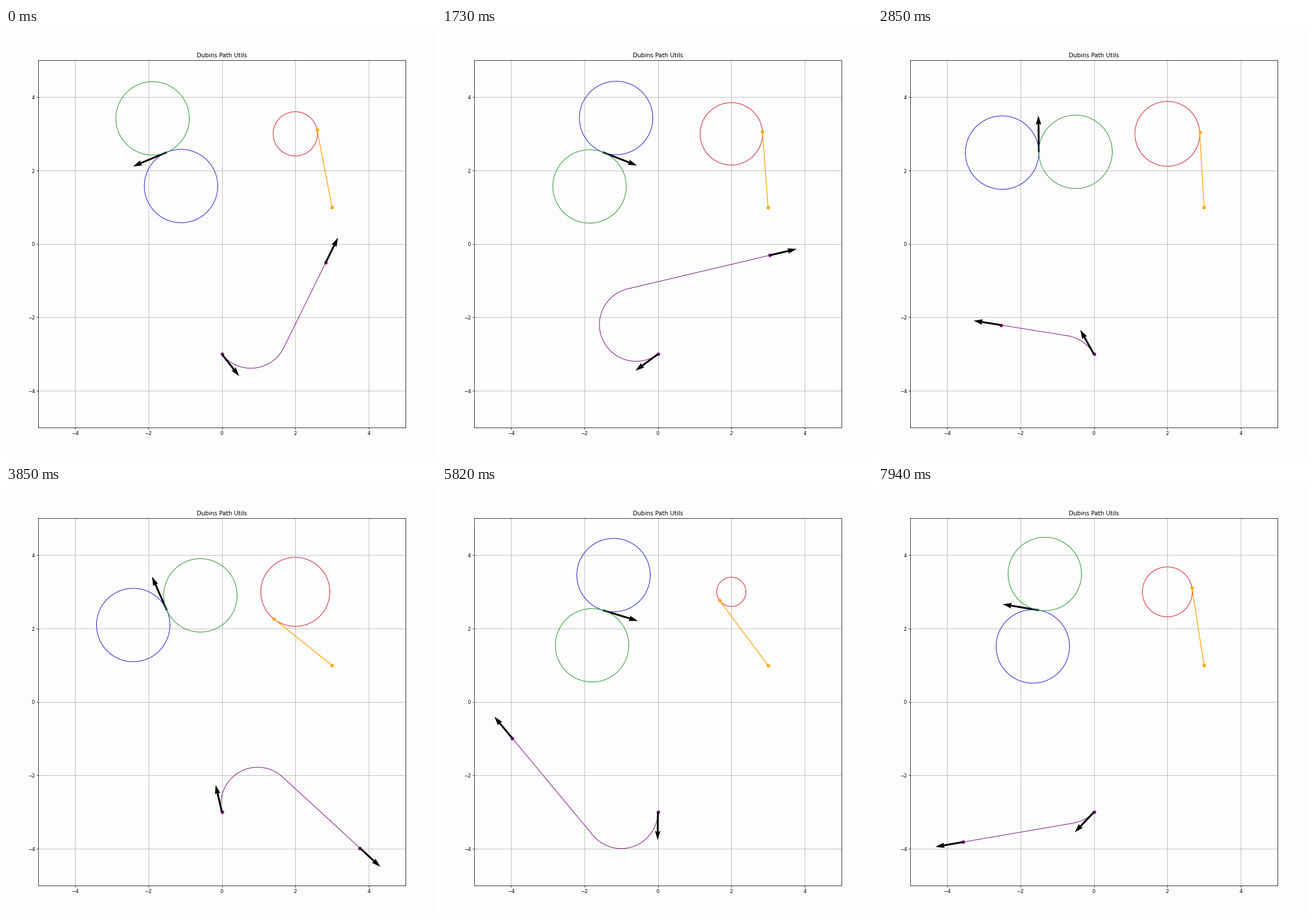
Write a matplotlib script that moves like this. It is 748 px wide and 748 px high and loops after 8 s.

```python
import numpy as np
import matplotlib.pyplot as plt
from matplotlib.animation import FuncAnimation

SIZE, DPI = 748, 100
LOOP, STEP = 8000, 40
PT = 72 / DPI           # points per pixel
K = 0.614               # shrink of matplotlib's default point sizes
RIGHT, LEFT = -1, 1
BLUE, GREEN, RED = "#1818cc", "#25922a", "#cc1a28"
PURPLE, PAPER = "#74107a", "#fdfdfd"

POSE = np.array([-1.5, 2.5])
RED_C = np.array([2.0, 3.0])
ANCHOR = np.array([3.0, 1.0])
START = np.array([0.0, -3.0])

# begin ms, pose heading, red radius, tangent side,
# path heading, turn, path end
SCENES = [
    (0, 202.8, 0.603, 1, -51.9, LEFT, (2.826, -0.509)),
    (720, -21.2, 0.850, 1, 216.3, RIGHT, (3.042, -0.309)),
    (2800, 90.6, 0.883, 1, 119.2, LEFT, (-2.528, -2.208)),
    (3800, 113.8, 0.940, -1, 102.9, RIGHT, (3.755, -3.974)),
    (4840, -17.0, 0.398, -1, -90.5, RIGHT, (-3.969, -0.983)),
    (5960, 52.5, 0.410, -1, 80.2, LEFT, (-3.082, -1.826)),
    (6960, 170.6, 0.680, 1, 226.5, RIGHT, (-3.567, -3.815)),
]


def unit(a):
    return np.array([np.cos(a), np.sin(a)])


def circle(center, r):
    t = np.linspace(0, 2 * np.pi, 181)
    return center[0] + r * np.cos(t), center[1] + r * np.sin(t)


def tangent_point(r, side):
    d = ANCHOR - RED_C
    a = np.arctan2(d[1], d[0]) + side * np.arccos(r / np.hypot(*d))
    return RED_C + r * unit(a)


def turn_then_straight(heading, turn, end):
    """Unit-radius arc from START, then a tangent line to end."""
    center = START + unit(heading + turn * np.pi / 2)
    d = end - center
    out = np.arctan2(d[1], d[0]) + turn * np.arcsin(1 / np.hypot(*d))
    sweep = (turn * (out - heading)) % (2 * np.pi)
    angles = heading + turn * np.linspace(0, sweep, 80) - turn * np.pi / 2
    x = np.append(center[0] + np.cos(angles), end[0])
    y = np.append(center[1] + np.sin(angles), end[1])
    return x, y, out


fig = plt.figure(figsize=(SIZE / DPI, SIZE / DPI), dpi=DPI, facecolor=PAPER)
box = 638.7 / SIZE
ax = fig.add_axes([56.2 / SIZE, 52.9 / SIZE, box, box], facecolor=PAPER)
ax.set(xlim=(-5, 5), ylim=(-5, 5))
ticks = [-4, -2, 0, 2, 4]
ax.set_xticks(ticks)
ax.set_yticks(ticks)
ax.grid(True, color="#b0b0b0", linewidth=0.8 * PT)
ax.tick_params(labelsize=10 * K, length=3.5 * K, width=0.8 * PT, pad=3.5 * K)
for spine in ax.spines.values():
    spine.set_linewidth(0.8 * PT)
ax.set_title("Dubins Path Utils", fontsize=12 * K, pad=6 * K)


def curve(color, width=1.0):
    return ax.plot([], [], color=color, lw=width * PT)[0]


def dots(color):
    return ax.plot([], [], "o", color=color, ms=5.1 * PT, mew=0.85 * PT)[0]


def arrow(zorder):
    return ax.quiver([0], [0], [1], [0], angles="xy", scale_units="xy",
                     scale=1, width=0.005, color="black", zorder=zorder)


blue, green, red = curve(BLUE), curve(GREEN), curve(RED)
orange, purple = curve("orange", 1.35), curve(PURPLE)
orange_dots, purple_dots = dots("orange"), dots("purple")
pose_arrow, start_arrow, end_arrow = arrow(1.8), arrow(3), arrow(3)


def aim(q, at, angle, length):
    q.set_offsets([at])
    q.XY = np.array([at])
    q.X, q.Y = np.array([at[0]]), np.array([at[1]])
    v = length * unit(angle)
    q.set_UVC([v[0]], [v[1]])


def draw(i):
    now = i * STEP
    scene = [s for s in SCENES if s[0] <= now][-1]
    _, pose, r, side, heading, turn, end = scene
    pose, heading, end = np.radians(pose), np.radians(heading), np.array(end)

    blue.set_data(*circle(POSE + unit(pose + np.pi / 2), 1))
    green.set_data(*circle(POSE + unit(pose - np.pi / 2), 1))
    aim(pose_arrow, POSE, pose, 1)

    red.set_data(*circle(RED_C, r))
    touch = tangent_point(r, side)
    for line in (orange, orange_dots):
        line.set_data([ANCHOR[0], touch[0]], [ANCHOR[1], touch[1]])

    x, y, out = turn_then_straight(heading, turn, end)
    purple.set_data(x, y)
    purple_dots.set_data([START[0], end[0]], [START[1], end[1]])
    aim(start_arrow, START, heading, 0.76)
    aim(end_arrow, end, out, 0.76)
    return []


anim = FuncAnimation(fig, draw, frames=LOOP // STEP, interval=STEP,
                     init_func=lambda: draw(0), repeat=True, repeat_delay=0)
plt.show()
```
